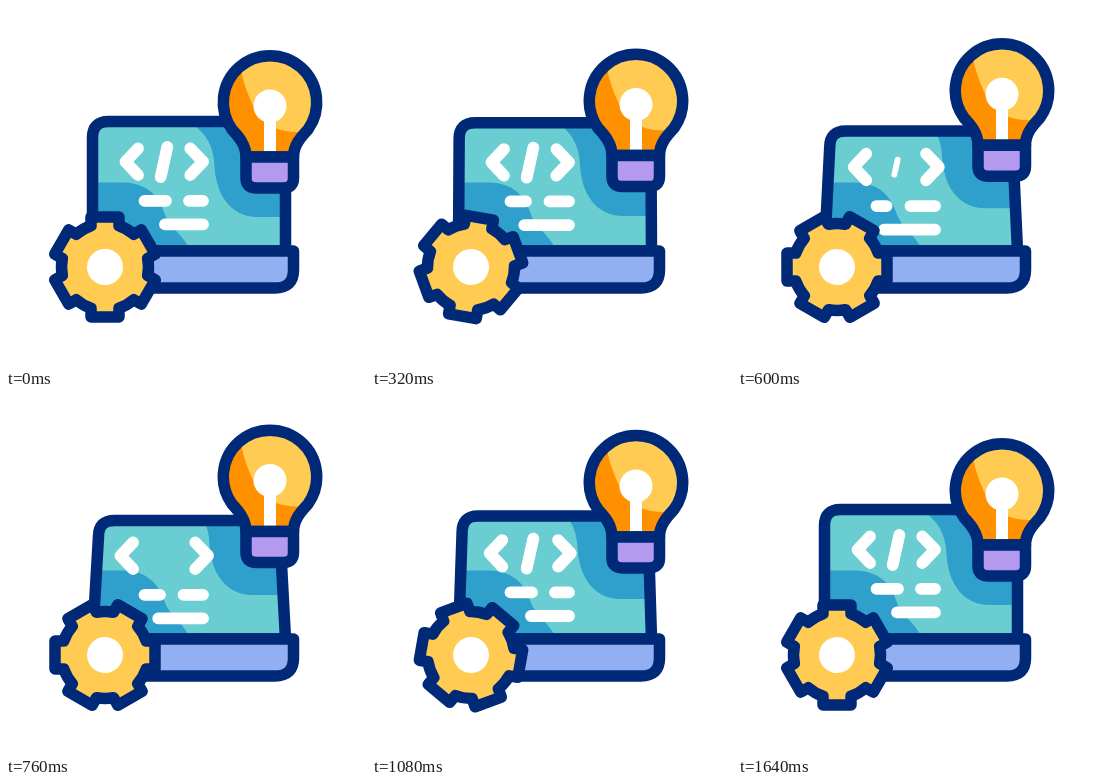
These frames come from a looping animation (360x360 px, 1.68 s). An HTML page:

```html
<!DOCTYPE html>
<html lang="en">
<head>
<meta charset="utf-8">
<title>Laptop, gear and bulb</title>
<style>
html, body { margin: 0; width: 100%; height: 100%; overflow: hidden; background: #fff; }
svg { display: block; width: 100vw; height: 100vh; }
.ink { stroke: #002a78; stroke-width: 11.5; stroke-linejoin: round; stroke-linecap: round; }
.chalk { fill: none; stroke: #fff; stroke-width: 11.8; stroke-linejoin: round; stroke-linecap: round; }
.white { fill: #fff; }
.none { fill: none; }
.amber { fill: #ffcb52; }
.deep { fill: #2f9fcb; }
</style>
</head>
<body>
<svg viewBox="0 0 360 360">
  <defs>
    <clipPath id="screen"><path class="lid"/></clipPath>
    <path id="glass" d="M240 151C240 139 233 131 226 123.500A46.700 46.700 0 1 1 302 123.500C295 131 287.500 139 287.500 151Z"/>
    <clipPath id="inside"><use href="#glass"/></clipPath>
  </defs>

  <g clip-path="url(#screen)">
    <path class="lid" fill="#69cdd1"/>
    <path class="deep" d="M60 176.500H118C140 177 152 189 158 206C164 224 177 227 185 246H60Z"/>
    <path id="pool" class="deep" d="M186 90V118C199 126 208 140 208.500 160C210 188 224 211 252 211H300V90Z"/>
  </g>
  <path class="lid ink none"/>
  <g id="code" class="chalk">
    <path id="left" d="M132 142.500L119.500 155.700L132 169"/>
    <path id="right" d="M184.300 142.500L197 155.700L184.300 169"/>
    <path id="slash" d="M3.300 -15L-3.300 15"/>
    <path id="lines"/>
  </g>
  <path class="ink" fill="#92aff1" d="M99 245H287.500V264Q287.500 282 269 282H99Z"/>

  <g id="bulb">
    <use href="#glass" class="amber"/>
    <path clip-path="url(#inside)" fill="#ff9100" d="M232 48C236 74 242 92 252 108C262 121 274 126 292 126V160H200V48Z"/>
    <circle class="white" cx="264" cy="100" r="16.500"/>
    <path class="white" d="M258 100H270V147H258Z"/>
    <use href="#glass" class="ink none"/>
    <path class="ink" fill="#b49aee" d="M240 151H287.500V172Q287.500 182 277 182H250.500Q240 182 240 172Z"/>
  </g>

  <g id="gear">
    <path id="teeth" class="ink amber"/>
    <circle class="white" r="18"/>
  </g>
</svg>
<script>
const LOOP = 1680, STEP = 40;
const $ = id => document.getElementById(id);
const lids = document.querySelectorAll('.lid');
const place = (id, x, y, extra = '') =>
  $(id).setAttribute('transform', `translate(${x} ${y}) ${extra}`);

// Smooth ramp from 0 to 1 between times a and b
function ramp(t, a, b) {
  const x = Math.min(1, Math.max(0, (t - a) / (b - a)));
  return x * x * x * (x * (6 * x - 15) + 10);
}

function gearPath(teeth, tip, root, half) {
  const r = Math.hypot(root, half);
  let path = '';
  for (let i = 0; i < teeth; i++) {
    const a = i * 2 * Math.PI / teeth, c = Math.cos(a), s = Math.sin(a);
    const at = (x, y) => `${x * c - y * s} ${x * s + y * c}`;
    path += (i ? `A${r} ${r} 0 0 1 ` : 'M') + at(-half, -root) +
      `L${at(-half, -tip)}L${at(half, -tip)}L${at(half, -root)}`;
  }
  return `${path}A${r} ${r} 0 0 1 ${-half} ${-root}Z`;
}

function lidPath(p) {
  const l = 86.5 + 6 * p, r = 279.5 - 5.5 * p, y = 115.6 + 10.8 * p, c = 16;
  return `M86.5 245L${l} ${y + c}Q${l} ${y} ${l + c} ${y}` +
    `H${r - c}Q${r} ${y} ${r} ${y + c}L279.5 245Z`;
}

function draw(t) {
  const lift = ramp(t, 170, 760) - ramp(t, 790, 1440);
  const turn = ramp(t, 100, 640) + ramp(t, 820, 1460);
  const type = t > 100 && t < 980 ? (1 - Math.cos((t - 100) / 440 * Math.PI)) / 2 : 0;
  const slash = 1 - ramp(t, 540, 660) + ramp(t, 900, 1020);
  const spread = 5 * lift * lift;

  lids.forEach(el => el.setAttribute('d', lidPath(lift)));
  place('pool', -5 * lift, -10 * lift);
  place('code', 0, 6 * lift);
  place('left', -spread, 0);
  place('right', spread, 0);
  place('slash', 158, 156, `scale(${slash})`);
  $('slash').style.display = slash < 0.02 ? 'none' : '';
  $('lines').setAttribute('d',
    `M138.500 194.8H${160 - 12 * type}M${183 - 11 * type} 194.8H197M${159 - 13.5 * type} 218.4H197`);
  place('bulb', 0, -13.5 * lift);
  place('gear', 99, 261, `rotate(${30 * turn})`);
}

$('teeth').setAttribute('d', gearPath(6, 50, 41.2, 14));

function tick() {
  draw(Math.floor(performance.now() % LOOP / STEP) * STEP);
  requestAnimationFrame(tick);
}
tick();
</script>
</body>
</html>
```
